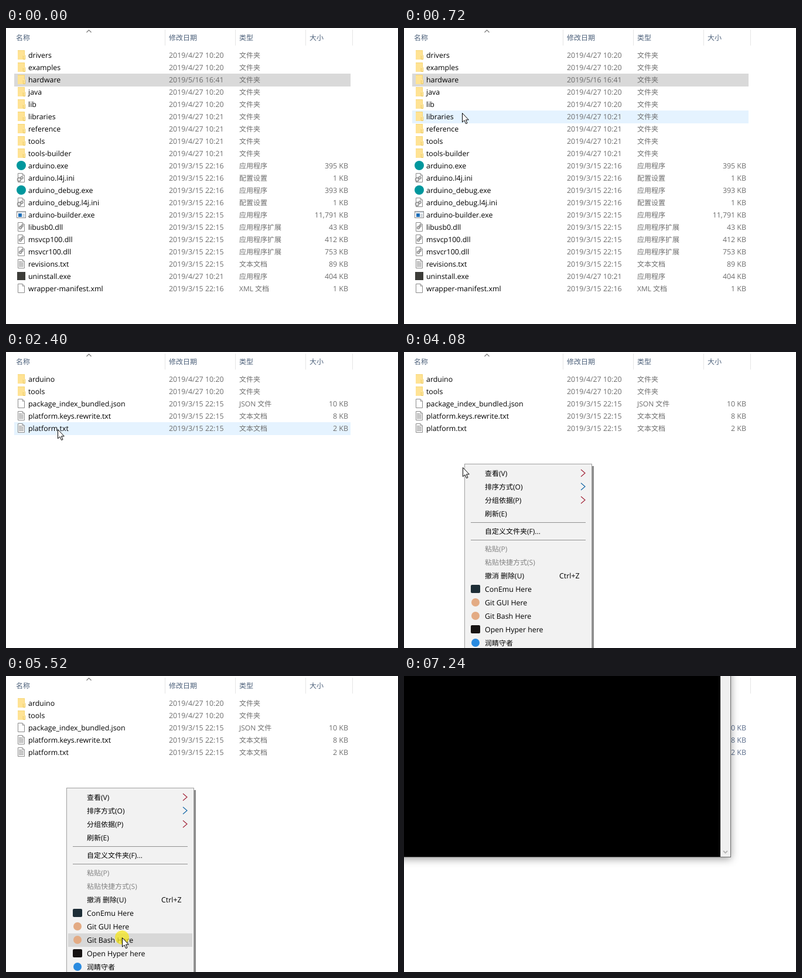
Write an HTML page that moves like this. It is 669x506 px and loops after 8000 ms.

```html
<!DOCTYPE html>
<html lang="zh-CN">
<head>
<meta charset="utf-8">
<title>File list</title>
<style>
html, body { margin: 0; width: 100%; height: 100%; overflow: hidden; background: #fff; }
svg { display: block; width: 669px; height: 506px; }
text { font: 12.4px "Open Sans", "Noto Sans CJK SC", "Noto Sans CJK", sans-serif; text-rendering: geometricPrecision; white-space: pre; }
text.cjk { font-size: 12px; }
.crisp { shape-rendering: crispEdges; }
#console { filter: drop-shadow(0 3px 7px rgba(0, 0, 0, .38)); transform-origin: 230px 60px; }
</style>
</head>
<body>
<svg id="stage" viewBox="0 0 669 506"></svg>
<script>
const LOOP = 8000, TICK = 40;
const $ = id => document.getElementById(id);

const rect = (x, y, w, h, fill, extra = '') =>
  `<rect x="${x}" y="${y}" width="${w}" height="${h}" fill="${fill}" ${extra}/>`;
const path = (d, stroke, fill = 'none', width = 1) =>
  `<path d="${d}" stroke="${stroke}" fill="${fill}" stroke-width="${width}"/>`;
const circle = (x, y, r, fill) => `<circle cx="${x}" cy="${y}" r="${r}" fill="${fill}"/>`;
const text = (x, y, s, fill, extra = '') =>
  `<text x="${x}" y="${y}" fill="${fill}" ${/[\u4e00-\u9fff]/.test(s) ? 'class="cjk"' : ''} ${extra}>${s}</text>`;

// Icons are drawn in a 16 x 16 box.
const page = path('M2.5 .5H10L13.5 4V15.5H2.5Z M10 .5V4H13.5', '#8a8a8a', '#fff');
const gear = (x, y, r) => `<circle cx="${x}" cy="${y}" r="${r}" fill="#e4e4e4" stroke="#8b8b8b" stroke-width="1.4"/>`;
const icons = {
  folder: rect(2, 0, 12, 16, '#f6d573') + rect(2, 1, 11, 15, '#ffe394') +
    rect(11, 8, 4, 8, '#ffe9a9') + path('M11.5 9V15.5H14.5V8.5', '#ecc657'),
  app: circle(8, 8, 8, '#00979d'),
  ini: page + gear(4.5, 11, 3) + gear(9, 8, 2),
  exe: rect(.5, 2.5, 15, 11, '#fff', 'stroke="#8a8a8a"') + rect(1, 3, 14, 2, '#c9d3dc') +
    rect(3, 6, 6, 6, '#1f6fb8') + path('M10 7.5H14M10 9.5H14M10 11.5H14', '#a9b5bf'),
  dll: page + gear(6.5, 9.5, 2) + gear(9.5, 6.5, 1.7),
  txt: page + path('M4 4.5H9M4 6.5H12M4 8.5H12M4 10.5H12M4 12.5H12', '#909090'),
  setup: rect(1, 1, 14, 14, '#3c3c38'),
  file: page
};
const icon = (kind, x, y) => `<g transform="translate(${x} ${y})">${icons[kind]}</g>`;

const KINDS = { folder: '文件夹', app: '应用程序', exe: '应用程序', setup: '应用程序', ini: '配置设置', dll: '应用程序扩展', txt: '文本文档' };
const APR20 = '2019/4/27 10:20', APR21 = '2019/4/27 10:21', MAR15 = '2019/3/15 22:15', MAR16 = '2019/3/15 22:16';
const rootFiles = [
  ['folder', 'drivers', APR20], ['folder', 'examples', APR20], ['folder', 'hardware', '2019/5/16 16:41'],
  ['folder', 'java', APR20], ['folder', 'lib', APR20], ['folder', 'libraries', APR21],
  ['folder', 'reference', APR21], ['folder', 'tools', APR21], ['folder', 'tools-builder', APR21],
  ['app', 'arduino.exe', MAR16, '395'], ['ini', 'arduino.l4j.ini', MAR16, '1'],
  ['app', 'arduino_debug.exe', MAR16, '393'], ['ini', 'arduino_debug.l4j.ini', MAR16, '1'],
  ['exe', 'arduino-builder.exe', MAR15, '11,791'], ['dll', 'libusb0.dll', MAR15, '43'],
  ['dll', 'msvcp100.dll', MAR15, '412'], ['dll', 'msvcr100.dll', MAR15, '753'],
  ['txt', 'revisions.txt', MAR15, '89'], ['setup', 'uninstall.exe', APR21, '404'],
  ['file', 'wrapper-manifest.xml', MAR16, '1', 'XML 文档']
];
const hardwareFiles = [
  ['folder', 'arduino', APR20], ['folder', 'tools', APR20],
  ['file', 'package_index_bundled.json', MAR15, '10', 'JSON 文件'],
  ['txt', 'platform.keys.rewrite.txt', MAR15, '8'], ['txt', 'platform.txt', MAR15, '2']
];
const fileRow = ([kind, name, date, size, type], i) => {
  const y = 51 + 21 * i;
  return icon(kind, 18, y - 13) + text(38, y, name, '#000') + text(278, y, date, '#6d6d6d') +
    text(398, y, type || KINDS[kind], '#6d6d6d') +
    (size ? text(584, y, size + ' KB', 'inherit', 'text-anchor="end" class="size" style="fill:var(--size,#6d6d6d)"') : '');
};

const header = [['名称', 17], ['修改日期', 278], ['类型', 398], ['大小', 518]]
  .map(([s, x]) => text(x, 21, s, '#4c607a')).join('') +
  [271, 391, 511, 591].map(x => rect(x, 3, 1, 27, '#e5e5e5')).join('') +
  path('M137.5 7.5L141.5 3.5L145.5 7.5', '#777', 'none', 1.2);

// Menu entries: centre line, label, icon markup or flag.
const badge = (y, fill) => rect(114, y - 7, 16, 14, fill, 'rx="2"');
const menuItems = [
  [207, '查看(V)', '#a3263a'], [230, '排序方式(O)', '#1669a8'], [253, '分组依据(P)', '#a3263a'], [276, '刷新(E)'],
  [306, '自定义文件夹(F)...'], [336, '粘贴(P)'], [359, '粘贴快捷方式(S)'], [382, '撤消 删除(U)'],
  [405, 'ConEmu Here'], [428, 'Git GUI Here'], [451, 'Git Bash Here'], [474, 'Open Hyper here'], [497, '润睛守者']
];
const menuIcons = badge(405, '#1d2d36') + circle(122, 428, 7, '#e3ab84') + circle(122, 451, 7, '#e3ab84') +
  badge(474, '#161313') + circle(122, 497, 7, '#2a8be0');
const menu = rect(107, 195, 217, 330, '#000', 'opacity=".45"') +
  rect(103.5, 191.5, 217, 330, '#f2f2f2', 'stroke="#a0a0a0"') +
  rect(106, 0, 212, 23, '#d8d8d8', 'id="menuHover"') +
  [291, 321].map(y => rect(114, y, 196, 1, '#919191')).join('') +
  menuItems.map(([y, s, arrow]) =>
    text(138, y + 5, s, s.startsWith('粘贴') ? '#838383' : '#000') +
    (arrow ? path(`M302 ${y - 6}L309 ${y}L302 ${y + 6}`, arrow, 'none', 1.2) : '')).join('') +
  text(265, 387, 'Ctrl+Z', '#000') + menuIcons;

const consoleWindow = rect(-300, -300, 858, 610, '#6a6a6a') + rect(-300, -300, 840, 609, '#000') +
  rect(540, -300, 17, 609, '#f0f0f0') + path('M545 299L548.5 302.5L552 299', '#b4b4b4', 'none', 1.8);

$('stage').innerHTML = rect(0, 0, 669, 506, '#fff') + header +
  rect(14, 78, 574, 22, '#d9d9d9', 'id="selected" class="crisp"') +
  rect(14, 0, 574, 22, '#e5f3ff', 'id="hover" class="crisp"') +
  `<g id="root">${rootFiles.map(fileRow).join('')}</g>
   <g id="hardware">${hardwareFiles.map(fileRow).join('')}</g>
   <g id="menu">${menu}</g><g id="console">${consoleWindow}</g>
   <g id="click" opacity=".75">${circle(0, 0, 12, '#f4e61e')}</g>
   <g id="arrow">${path('M.5 .5V16L4 12.8L6.6 18.6L9 17.6L6.5 12H11.3Z', '#000', '#fff')}</g>
   <g id="beam">${path('M-3 -7.5H-1L0 -6.5L1 -7.5H3M0 -6.5V6.5M-3 7.5H-1L0 6.5L1 7.5H3', '#fff')}</g>`;

// Pointer track: time, x, y.
const track = [
  [120, 190, 483], [240, 172, 402], [400, 143, 292], [560, 117, 202], [720, 99, 145], [920, 69, 95],
  [1000, 69, 95], [1040, 69, 92], [2160, 69, 92], [2400, 88, 132], [2640, 98, 168], [2920, 103, 191],
  [3800, 103, 191], [3840, 100, 190], [4040, 100, 190], [4080, 100, 197], [4280, 112, 262],
  [4560, 150, 364], [4880, 196, 444], [4920, 198, 447], [6320, 198, 447], [6480, 214, 392],
  [6720, 190, 240], [6960, 155, 90], [7160, 168.5, 25], [LOOP, 168.5, 25]
];
const clicks = [[1040, 1160], [1240, 1320], [2960, 3080], [5520, 5680]];

function pointerAt(t) {
  const i = track.findIndex(k => k[0] > t);
  if (i < 1) return [track[0][1], track[0][2]];
  const [a, b] = [track[i - 1], track[i]], f = (t - a[0]) / (b[0] - a[0]);
  return [a[1] + (b[1] - a[1]) * f, a[2] + (b[2] - a[2]) * f].map(v => Math.round(v * 2) / 2);
}
const show = (id, on) => { $(id).style.display = on ? '' : 'none'; };
const clamp = v => Math.max(0, Math.min(1, v));

function draw(t) {
  const [x, y] = pointerAt(t);
  const inRoot = t < 1680, visible = t >= 120 && t < 7240;
  const menuOpen = t >= 3320 && t < 5680;
  const opening = clamp((t - 5720) / 320);
  const onConsole = opening === 1 && y < 310;

  show('root', inRoot);
  show('hardware', !inRoot);

  const row = Math.floor((y - 36) / 21), rows = inRoot ? rootFiles.length : hardwareFiles.length;
  const hovering = visible && t < 3320 && row >= 0 && row < rows;
  const overSelected = inRoot && hovering && row === 2;
  show('selected', inRoot && !overSelected);
  show('hover', hovering);
  const hover = $('hover'), inset = overSelected ? .5 : 0;
  const box = { x: 14 + inset, y: 36 + 21 * row + inset, width: 574 - 2 * inset, height: 22 - 2 * inset,
    fill: overSelected ? '#cce8ff' : '#e5f3ff', stroke: overSelected ? '#99d1ff' : 'none' };
  for (const key in box) hover.setAttribute(key, box[key]);

  show('menu', menuOpen);
  $('menu').style.opacity = clamp((t - 3280) / 160);
  const item = menuItems.find(([c]) => y >= c - 11 && y < c + 12);
  show('menuHover', item && x >= 106);
  if (item) $('menuHover').setAttribute('y', item[0] - 11);

  const eased = 1 - (1 - opening) ** 3;
  show('console', opening > 0);
  $('console').style.opacity = eased;
  $('console').style.transform = `scale(${.9 + .1 * eased})`;
  $('stage').style.setProperty('--size', opening > 0 ? '#5a6c8a' : '#6d6d6d');

  show('click', clicks.some(([a, b]) => t >= a && t < b));
  show('arrow', visible && !onConsole);
  show('beam', visible && onConsole);
  for (const id of ['click', 'arrow', 'beam']) $(id).setAttribute('transform', `translate(${x} ${y})`);
}

const start = performance.now();
function frame() {
  const t = (performance.now() - start) % LOOP;
  draw(Math.floor(t / TICK) * TICK);
  requestAnimationFrame(frame);
}
draw(0);
requestAnimationFrame(frame);
</script>
</body>
</html>
```
